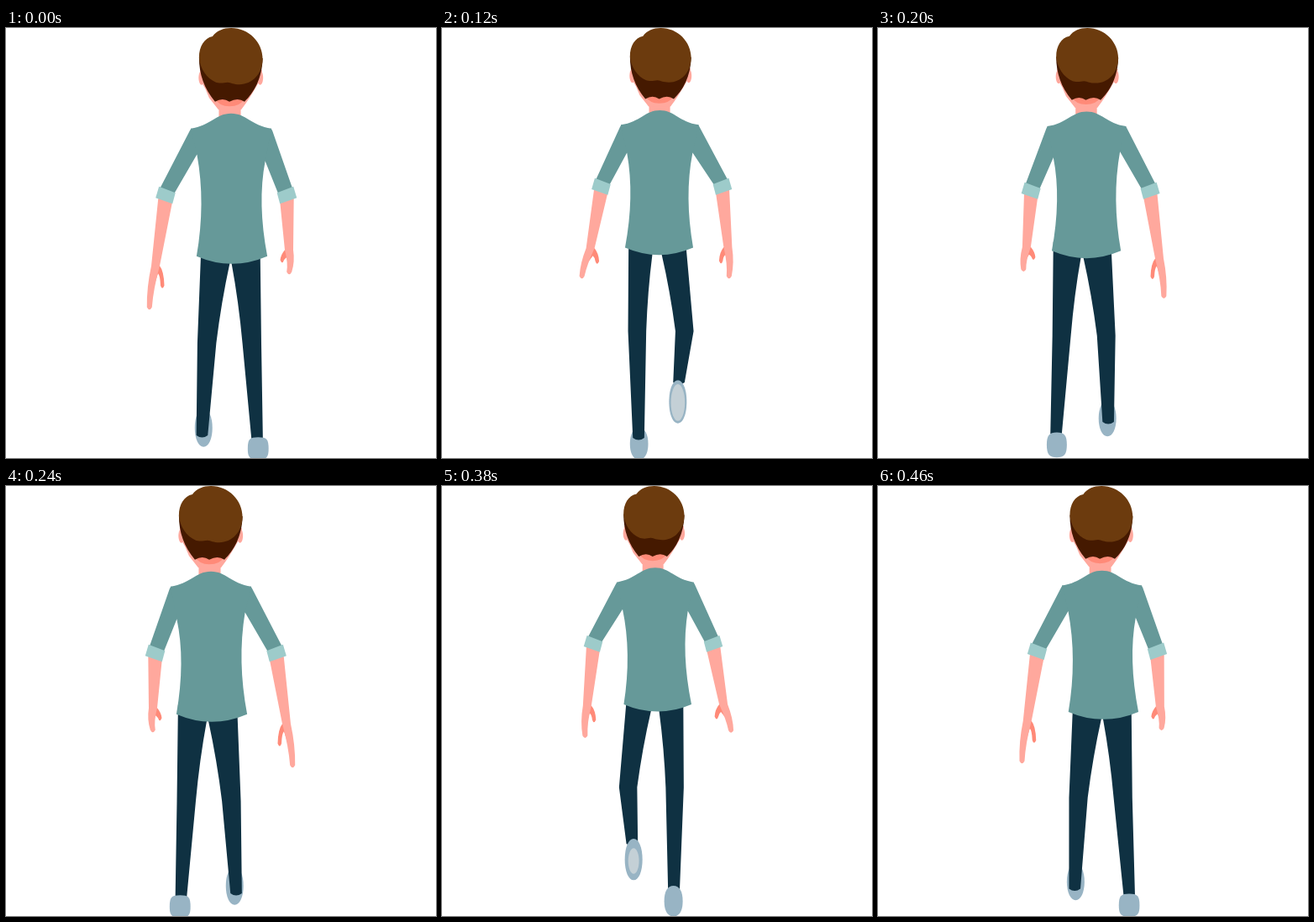
Animation, 512 px wide and 512 px high, one loop 0.48 s. Source, as an HTML page with a canvas:

```html
<!DOCTYPE html>
<html lang="en">
<head>
<meta charset="utf-8">
<title>Walk cycle</title>
<style>
  html, body { margin: 0; width: 100%; height: 100%; overflow: hidden; background: #fff; }
  canvas { display: block; width: 100vw; height: 100vh; object-fit: contain; }
</style>
</head>
<body>
<canvas id="stage" width="512" height="512"></canvas>
<script>
const ctx = document.getElementById('stage').getContext('2d');
const LOOP = 480, STEP = 20, TURN = 2 * Math.PI;

const COLOR = {
  hair: '#6c3b0e', hairDark: '#451900', skin: '#ffa89d', skinDark: '#ff8a78',
  shirt: '#669999', cuff: '#9dcbca', pants: '#0f3142', shoe: '#98b4c4', sole: '#c4d0d6'
};

// Periodic motion: a mean plus [cos, sin] amplitudes of each harmonic.
const wave = (mean, ...harmonics) => t =>
  harmonics.reduce((sum, [c, s], i) => {
    const a = TURN * (i + 1) * t / LOOP;
    return sum + c * Math.cos(a) + s * Math.sin(a);
  }, mean);

// x is measured from the mirror axis; limbs are the right-hand ones.
const body = {
  head: wave(0, [9.7, 4.2], [0, 0], [2.3, -.3]),
  hem: wave(0, [9.8, .7], [0, 0], [2.2, -.8]),
  crotch: wave(0, [12, 1.3], [0, 0], [1.75, -.95]),
  gap: wave(6.5, [0, 0], [-4.5, 1.5]),
  size: wave(.984, [0, 0], [.019, .0165]),
  dip: wave(0, [4, 0])
};
const arm = {
  cuffX: wave(72, [5.4, 5], [0, 1.5], [.8, -.7]),
  cuffY: wave(194.1, [0, 0], [5.1, 3]),
  wristX: wave(80.7, [1.5, 2.5], [-1.2, 1.2]),
  wristY: wave(267.7, [-8.3, -.6], [6, 3.5], [-1.2, 0]),
  tipX: wave(85.4, [-2, -1.8], [-2.2, .9]),
  tipY: wave(305.4, [-18.5, 0], [8, 4.7], [-2.5, 0])
};
const leg = {
  kneeX: wave(27.5, [10.7, 5], [-.7, .7], [1.5, -1.8]),
  ankleX: wave(28.4, [10.1, 1.6], [4.4, -.5], [2.4, -2.7]),
  ankleY: wave(471.1, [.8, -26.2], [16, 3.7], [1.2, 6.8]),
  shoeX: wave(27.8, [11.9, 2.4], [4.7, 0], [2.1, -1.6]),
  shoeY: wave(479.2, [10.7, -21], [9.1, 3.7], [1.5, 4]),
  shoeR: wave(20.1, [-3.6, 2.4], [-2.1, 1], [-1.1, -1])
};

const SHOE_BEHIND = 165, SHOE_FRONT = 370;

const HAIR = new Path2D('M-38 35C-38 22-32 12-22 10C-17 3-9 0 0 0C21 0 37.5 17 37.5 37' +
  'C37 55 25 67 10 67C3 67 0 65-4 64.5C-12 66-16 65-18 64.5C-29 60-37 48-38 35Z');
const NAPE = new Path2D('M-38 35C-38 55-32 72-19 87.5Q-10 82-2 87.5Q8 82 16 87.5C27 77 37 60 37.5 36Z');
const FACE = new Path2D('M-37 50L-35 64Q-30 72-26 83L-15 97H12Q22 84 33 64L37 50Z');
const CHIN = new Path2D('M-19 84Q-14 93-2 93Q11 93 16 84Z');

const pose = (waves, t) =>
  Object.fromEntries(Object.entries(waves).map(([name, f]) => [name, f(t)]));

function bodyPose(t) {
  const b = pose(body, t);
  b.chest = .6 * b.head + .4 * b.hem;
  return b;
}

function fill(color, path) {
  ctx.fillStyle = color;
  ctx.fill(path);
}

function poly(color, ...pts) {
  const p = new Path2D();
  pts.forEach(([x, y]) => p.lineTo(x, y));
  p.closePath();
  fill(color, p);
}

// Oval whose corners grow squarer with k.
function oval(color, x, y, rx, ry, k = .55) {
  const p = new Path2D(), kx = rx * k, ky = ry * k;
  p.moveTo(x, y - ry);
  p.bezierCurveTo(x + kx, y - ry, x + rx, y - ky, x + rx, y);
  p.bezierCurveTo(x + rx, y + ky, x + kx, y + ry, x, y + ry);
  p.bezierCurveTo(x - kx, y + ry, x - rx, y + ky, x - rx, y);
  p.bezierCurveTo(x - rx, y - ky, x - kx, y - ry, x, y - ry);
  fill(color, p);
}

function drawShoe(g, t) {
  const box = Math.max(0, Math.min(1, (20 - g.shoeR) / 7));
  oval(COLOR.shoe, g.shoeX, g.shoeY, 10.5 + 2 * box, g.shoeR, .58 + .24 * box);

  // The sole turns into view while the foot is lifted.
  const u = t / SHOE_BEHIND;
  if (u <= 0 || u >= 1) return;
  const rx = 9.5 * Math.sqrt(Math.sin(Math.PI * u));
  const ry = 23 * Math.sin(Math.PI * u ** 1.6);
  oval(COLOR.sole, g.shoeX, g.shoeY + 8 * u - 5, rx, ry);
}

function drawLeg(t) {
  const g = pose(leg, t), b = bodyPose(t), s = b.size;
  const inner = b.crotch + b.gap / 2, kneeY = 374 * s, w = 11.2 * s;
  const limb = new Path2D();
  limb.moveTo(inner, 260 * s);
  limb.lineTo(b.crotch + 35 * s, 260 * s);
  limb.lineTo(g.kneeX + w, kneeY);
  limb.lineTo(g.ankleX + 6.8, g.ankleY);
  limb.quadraticCurveTo(g.ankleX, g.ankleY + 5, g.ankleX - 6.8, g.ankleY);
  limb.lineTo(g.kneeX - w, kneeY);
  limb.quadraticCurveTo((inner + g.kneeX - w) / 2 + 2, 325 * s, inner, 279 * s);
  const legOnTop = t >= SHOE_BEHIND && t < SHOE_FRONT;
  if (legOnTop) drawShoe(g, t);
  fill(COLOR.pants, limb);
  if (!legOnTop) drawShoe(g, t);
}

function drawArm(t) {
  const { cuffX: x, cuffY: y, wristX: wx, wristY: wy, tipX, tipY } = pose(arm, t);
  const { chest: c, size: s, dip } = bodyPose(t);
  const mx = (wx + tipX) / 2, my = (wy + tipY) / 2;

  const thumb = new Path2D();
  thumb.moveTo(wx - 5, wy);
  thumb.quadraticCurveTo(wx - 10, wy + 6, wx - 10.5, my - 2);
  thumb.quadraticCurveTo(wx - 8, my + 4, wx - 6, my - 2);
  thumb.quadraticCurveTo(wx - 5.5, wy + 11, wx - 3, wy + 9);
  thumb.lineTo(mx - 1, my + 1);
  thumb.lineTo(wx, wy);
  fill(COLOR.skinDark, thumb);

  const hand = new Path2D();
  hand.moveTo(x - 8 * s, y + 7);
  hand.lineTo(x + 8.5 * s, y);
  hand.lineTo(wx + 5, wy);
  hand.quadraticCurveTo(mx + 7, my, tipX + 3, tipY - 2);
  hand.quadraticCurveTo(tipX, tipY + 3.5, tipX - 3, tipY - 2);
  hand.quadraticCurveTo(mx - 1, my + 2, wx - 5, wy);
  fill(COLOR.skin, hand);

  poly(COLOR.shirt, [c + 25, 125 * s], [c + 47.5 * s, 119.5 * s], [c + 49 * s, 122 * s],
    [x + 7 * s, y - 8 * s], [x - 10 * s, y - 2 * s], [c + 40.5 * s, 154 * s + dip], [c + 25, 160 * s]);
  poly(COLOR.cuff, [x - 11.5 * s, y - 3 * s], [x + 8 * s, y - 10.5 * s],
    [x + 12 * s, y + 3 * s], [x - 8 * s, y + 10 * s]);
}

function drawShirt({ chest: c, hem, size: s, dip }) {
  const h = hem + 1, mid = (c + h) / 2;
  const X = v => c + v * s;
  const p = new Path2D();
  p.moveTo(X(-48), 119.5 * s);
  p.bezierCurveTo(X(-24), 116 * s, X(-18), 101.5 * s, X(0), 101.5 * s);
  p.bezierCurveTo(X(18), 101.5 * s, X(24), 116 * s, X(48), 119.5 * s);
  p.lineTo(X(40.5), 154 * s + dip);
  p.quadraticCurveTo(mid + 30.5 * s, 207.5 * s, h + 42 * s, 271 * s);
  p.quadraticCurveTo(h, 289 * s, h - 42 * s, 271 * s);
  p.quadraticCurveTo(mid - 30.5 * s, 207.5 * s, X(-40.5), 154 * s - dip);
  fill(COLOR.shirt, p);
}

function inHead(b, draw) {
  ctx.save();
  ctx.translate(b.head, 0);
  ctx.scale(b.size, b.size);
  draw();
  ctx.restore();
}

// The left limb is the right one mirrored, half a loop later.
function bothSides(draw, t, shift = 0) {
  ctx.save();
  ctx.translate(shift, 0);
  draw(t);
  ctx.scale(-1, 1);
  draw((t + LOOP / 2) % LOOP);
  ctx.restore();
}

function render(t) {
  const b = bodyPose(t);
  ctx.setTransform(1, 0, 0, 1, 0, 0);
  ctx.fillStyle = '#fff';
  ctx.fillRect(0, 0, 512, 512);
  ctx.translate(256, 0);

  bothSides(drawLeg, t, -2.25);
  inHead(b, () => poly(COLOR.skin, [-14.5, 85], [11.5, 85], [11.5, 108], [-14.5, 108]));
  bothSides(drawArm, t);
  drawShirt(b);
  inHead(b, () => {
    oval(COLOR.skin, -35, 59, 3.5, 8.5);
    oval(COLOR.skin, 34.5, 59, 3.5, 8.5);
    fill(COLOR.skin, FACE);
    fill(COLOR.skinDark, CHIN);
    fill(COLOR.hairDark, NAPE);
    fill(COLOR.hair, HAIR);
  });
}

const start = performance.now();
function tick() {
  const t = (performance.now() - start) % LOOP;
  render(Math.floor(t / STEP) * STEP);
  requestAnimationFrame(tick);
}
tick();
</script>
</body>
</html>
```
